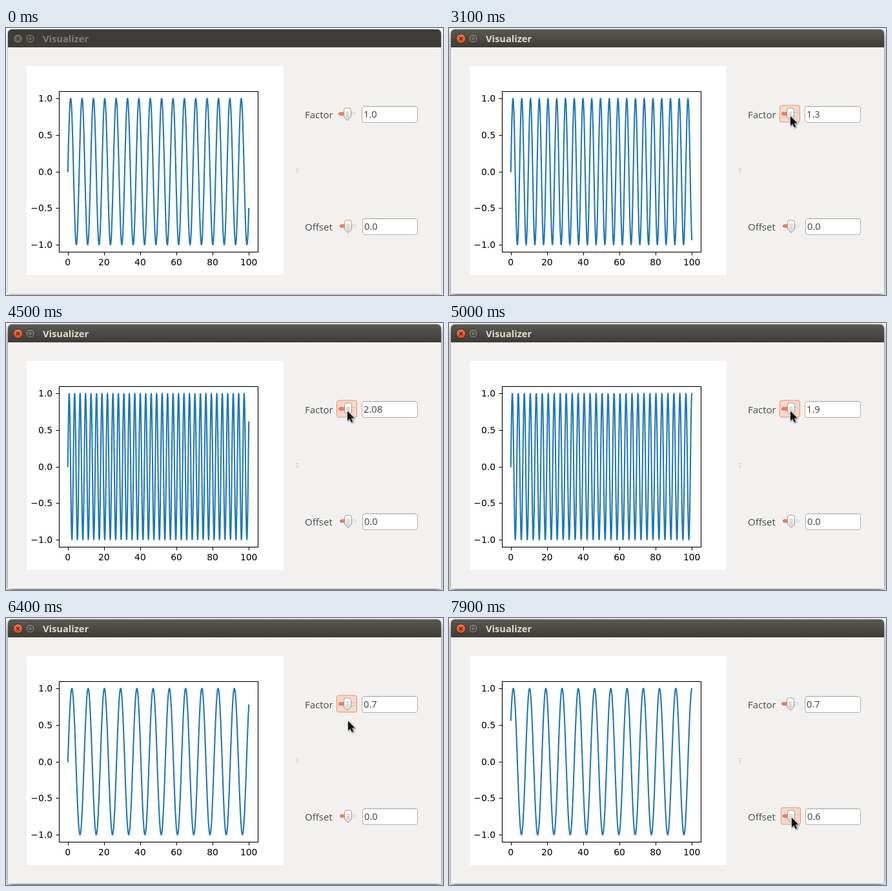
Write an HTML page with a canvas that moves like this. It is 677 px wide and 414 px high and loops after 8 s.

```html
<!DOCTYPE html>
<html lang="en">
<head>
<meta charset="utf-8">
<title>Visualizer</title>
<style>
  html, body { margin: 0; width: 100%; height: 100%; overflow: hidden; background: #fff; }
  canvas { display: block; }
</style>
</head>
<body>
<canvas id="stage" width="677" height="414"></canvas>
<script>
const ctx = document.getElementById('stage').getContext('2d');
const LOOP = 8000;
const NOTCH = 0.06;
const UI = '"Open Sans", "Noto Sans", sans-serif';
const PLOT = '13.89px "DejaVu Sans", sans-serif';

// Wheel notches: [time, running total]
const factorSteps = [
  [2700, 1], [2900, 2], [3000, 3], [3100, 5], [3200, 7], [3300, 8],
  [3700, 9], [3800, 11], [3900, 13], [4000, 14], [4400, 16], [4500, 18],
  [4900, 17], [5000, 15], [5100, 12], [5200, 10], [5500, 6], [5600, 2],
  [6000, -2], [6100, -5]
];
const offsetSteps = [[7400, 1], [7500, 3], [7600, 5], [7700, 7], [7800, 9], [7900, 10]];

function notches(steps, t) {
  let n = 0;
  for (const [at, total] of steps) if (t >= at) n = total;
  return n * NOTCH;
}

function cursorAt(t) {
  if (t < 400) return null;
  const step = Math.floor(t / 100);
  if (step < 12) {
    const p = 1 - Math.pow(1 - (step - 4) / 7, 1.6);
    return [Math.round(475 + 53 * p), Math.round(-4 + 143 * p)];
  }
  if (step < 13) return [528, 138];
  if (step < 64) return [528, 135];
  const p = Math.min(1, (step - 64) / 6);
  const y = 158 + 150 * p * p * (3 - 2 * p);
  return [Math.round(529 + p * 0.6 + 4 * Math.sin(Math.PI * p)), Math.round(y)];
}

function gradient(y0, y1, ...colors) {
  const g = ctx.createLinearGradient(0, y0, 0, y1);
  colors.forEach((c, i) => g.addColorStop(i / (colors.length - 1), c));
  return g;
}

function box(x, y, w, h, r, fill, stroke) {
  ctx.beginPath();
  ctx.roundRect(x, y, w, h, r);
  if (fill) { ctx.fillStyle = fill; ctx.fill(); }
  if (stroke) { ctx.strokeStyle = stroke; ctx.lineWidth = 1; ctx.stroke(); }
}

function line(x0, y0, x1, y1, color, width = 1) {
  ctx.beginPath();
  ctx.moveTo(x0, y0);
  ctx.lineTo(x1, y1);
  ctx.strokeStyle = color;
  ctx.lineWidth = width;
  ctx.stroke();
}

function text(str, x, y, font, color, align = 'left') {
  ctx.font = font;
  ctx.fillStyle = color;
  ctx.textAlign = align;
  ctx.fillText(str, x, y);
}

function polygon(points, fill, stroke) {
  ctx.beginPath();
  points.forEach(([x, y]) => ctx.lineTo(x, y));
  ctx.closePath();
  ctx.lineJoin = 'round';
  if (stroke) { ctx.strokeStyle = stroke; ctx.lineWidth = 1.6; ctx.stroke(); }
  ctx.fillStyle = fill;
  ctx.fill();
}

function titleButton(x, fill, edge) {
  ctx.beginPath();
  ctx.arc(x, 16.5, 7.2, 0, Math.PI * 2);
  ctx.fillStyle = fill;
  ctx.fill();
  ctx.strokeStyle = edge;
  ctx.lineWidth = 1;
  ctx.stroke();
}

function drawWindow(focused) {
  ctx.fillStyle = '#fff';
  ctx.fillRect(0, 0, 677, 414);
  ctx.save();
  ctx.shadowColor = focused ? 'rgba(0,0,0,.6)' : 'rgba(0,0,0,.35)';
  ctx.shadowBlur = focused ? 12 : 6;
  ctx.shadowOffsetY = focused ? 4 : 2;
  box(3, 2, 671, 410, [6, 6, 0, 0], '#f2f1f0');
  ctx.restore();

  const bar = focused ? gradient(2, 30, '#5a5951', '#4b4a44', '#3c3b37') : '#3d3c38';
  box(3, 2, 671, 28, [6, 6, 0, 0], bar);
  line(8, 2.5, 669, 2.5, focused ? '#69675f' : '#44433f');

  const mark = focused ? '#4a2a1b' : '#3a3935';
  titleButton(18.5, focused ? gradient(9, 24, '#f4764b', '#df4a16') : '#68665f', '#33322e');
  line(16, 14, 21, 19, mark, 1.4);
  line(21, 14, 16, 19, mark, 1.4);
  titleButton(37.5, focused ? gradient(9, 24, '#7e7c73', '#605e57') : '#605e57', '#33322e');
  box(34.5, 13.5, 6, 6, 0, null, '#35342f');

  text('Visualizer', 57, 22, 'bold 14.67px ' + UI, focused ? '#dfdbd2' : '#817e77');

  for (const y of [218.5, 221.5, 224.5]) {
    line(449, y, 453, y, '#c5c3c0');
    line(449, y + 1, 453, y + 1, '#fcfcfc');
  }
}

function drawPlot(factor, offset) {
  ctx.fillStyle = '#fff';
  ctx.fillRect(32, 59, 398, 324);
  const px = x => 95.77 + 2.804 * x;
  const py = y => 222.62 - 113.4 * y;

  ctx.beginPath();
  for (let i = 0; i <= 1000; i++) {
    const x = i / 10;
    ctx.lineTo(px(x), py(Math.sin(factor * x + offset)));
  }
  ctx.strokeStyle = '#1f77b4';
  ctx.lineWidth = 2.08;
  ctx.lineJoin = 'round';
  ctx.lineCap = 'square';
  ctx.stroke();
  ctx.lineCap = 'butt';

  for (let x = 0; x <= 100; x += 20) {
    const tx = Math.round(px(x)) + 0.5;
    line(tx, 348, tx, 352.5, '#000', 1.1);
    text(String(x), px(x), 368, PLOT, '#000', 'center');
  }
  for (let y = -1; y <= 1; y += 0.5) {
    const ty = Math.round(py(y)) + 0.5;
    line(77.5, ty, 82, ty, '#000', 1.1);
    text(y.toFixed(1).replace('-', '\u2212'), 72, Math.round(py(y) + 5), PLOT, '#000', 'right');
  }
  ctx.strokeStyle = '#000';
  ctx.lineWidth = 1.11;
  ctx.lineJoin = 'miter';
  ctx.strokeRect(82.5, 98.5, 308, 249);
}

function drawSlider(x, y, w, knob, active) {
  if (active) box(x - 2.5, y - 13.5, w + 3, 26, 3, '#f6d8cb', '#f0906a');
  box(x + 0.5, y - 2.5, w - 2, 4, 2, active ? '#e9d3ca' : '#e6e4e1', active ? '#dcc0b4' : '#d9d6d2');
  box(x + 0.5, y - 2.5, knob - x - 2, 4, 2, '#f58257', '#d9643a');
  line(knob + 6, y, x + w - 2, y, '#faf8f7');

  ctx.beginPath();
  ctx.moveTo(knob - 5.5, y - 6);
  ctx.quadraticCurveTo(knob - 5.5, y - 9.5, knob - 2, y - 9.5);
  ctx.lineTo(knob + 2, y - 9.5);
  ctx.quadraticCurveTo(knob + 5.5, y - 9.5, knob + 5.5, y - 6);
  ctx.lineTo(knob + 5.5, y + 4.5);
  ctx.lineTo(knob, y + 10);
  ctx.lineTo(knob - 5.5, y + 4.5);
  ctx.closePath();
  ctx.fillStyle = gradient(y - 9, y + 10, '#fdfdfd', '#eeedeb', '#d5d3d0');
  ctx.fill();
  ctx.strokeStyle = '#a09d98';
  ctx.lineWidth = 1;
  ctx.stroke();
  for (const dy of [-2.5, 0.5, 3.5]) line(knob - 2, y + dy, knob + 2, y + dy, '#bbb8b4');
}

function drawEntry(x, y, w, value) {
  box(x + 0.5, y + 0.5, w - 1, 25, 3.5, '#fff', '#b3afa9');
  line(x + 3, y + 1.5, x + w - 3, y + 1.5, '#e6e4e2');
  text(value, x + 3, y + 18, '14.67px ' + UI, '#3c3c3c');
}

function format(v) {
  const s = String(Math.round(v * 100) / 100);
  return s.includes('.') ? s : s + '.0';
}

function drawCursor([x, y]) {
  const arrow = [[0.8, 1.5], [0.8, 16.5], [4.2, 13.4], [6.6, 19], [9.2, 17.9], [6.8, 12.4], [11.4, 12.2]];
  ctx.save();
  ctx.translate(x, y);
  ctx.save();
  ctx.shadowColor = 'rgba(0,0,0,.35)';
  ctx.shadowBlur = 2;
  ctx.shadowOffsetX = 1;
  ctx.shadowOffsetY = 1;
  polygon(arrow, '#fff', '#fff');
  ctx.restore();
  polygon(arrow, '#111');
  ctx.restore();
}

function draw(t) {
  const factor = 1 + notches(factorSteps, t);
  const offset = notches(offsetSteps, t);
  drawWindow(t >= 1700);
  drawPlot(factor, offset);

  text('Factor', 463, 140, '15px ' + UI, '#4c4c4c');
  drawSlider(515, 133.5, 28, factor > 1.5 ? 530 : 529, t >= 1700 && t < 7100);
  drawEntry(551, 121, 87, format(factor));

  text('Offset', 463, 314, '15px ' + UI, '#4c4c4c');
  drawSlider(517, 307.5, 27, 530, t >= 7100);
  drawEntry(552, 295, 86, format(offset));

  const cursor = cursorAt(t);
  if (cursor) drawCursor(cursor);
}

const start = performance.now();
function tick() {
  draw((performance.now() - start) % LOOP);
  requestAnimationFrame(tick);
}
tick();
</script>
</body>
</html>
```
